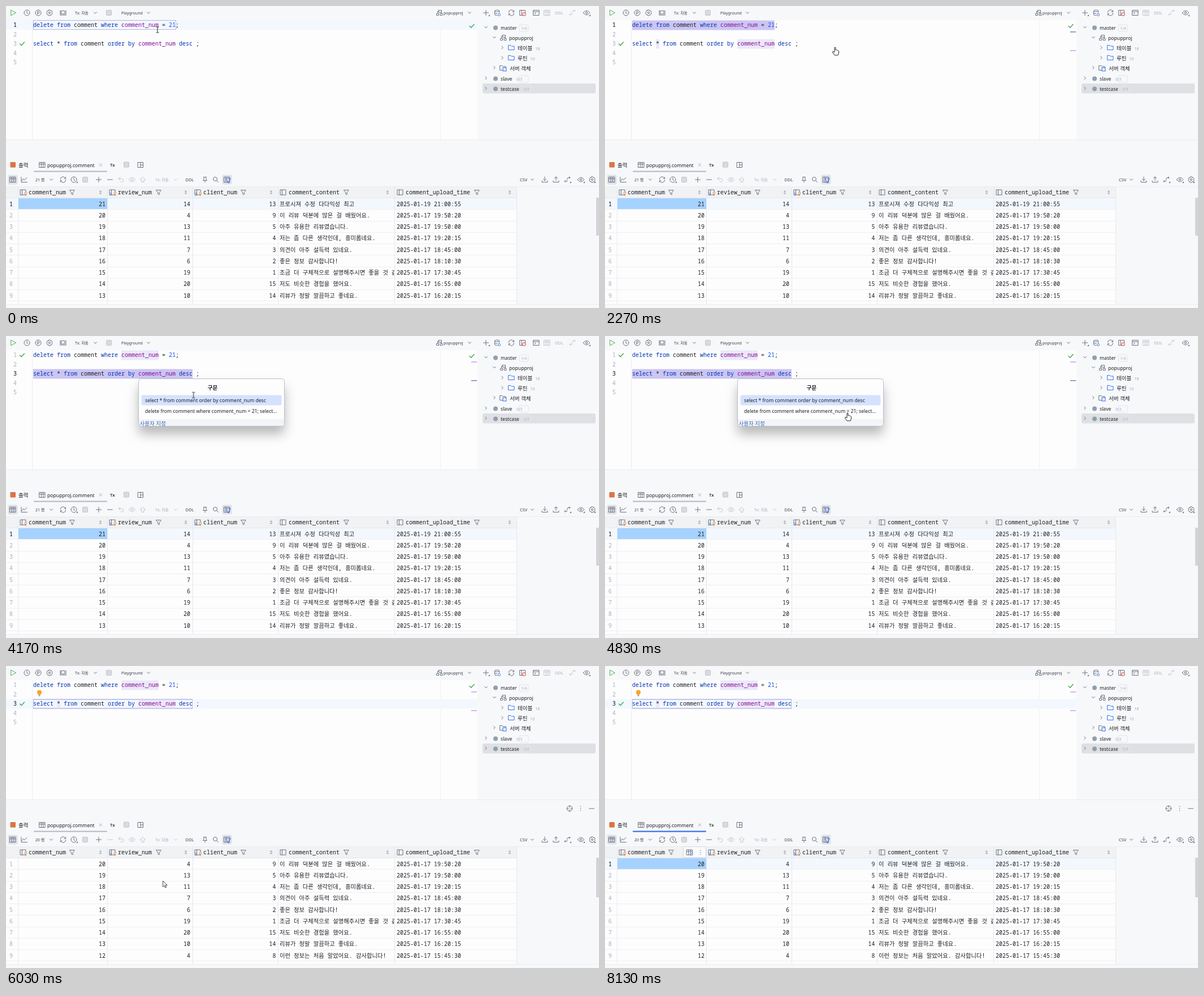
Write an HTML page that moves like this. It is 1049 px wide and 534 px high and loops after 8160 ms.

```html
<!DOCTYPE html>
<html lang="ko">
<head>
<meta charset="utf-8">
<title>SQL console</title>
<style>
html, body { margin: 0; width: 100%; height: 100%; overflow: hidden; background: #f7f8fa; }
svg { display: block; width: 1049px; height: 534px; }
text { font: 8.65px 'Noto Sans', 'Noto Sans CJK KR', sans-serif; fill: #1e1f24; white-space: pre; }
text.s { font-size: 7px; fill: #3c3f49; }
text.m { font-size: 7.5px; fill: #3c3f49; }
text.k { font-size: 9.5px; }
text.b { font-weight: 600; }
text.c { font: 10px 'Noto Sans Mono', 'DejaVu Sans Mono', monospace; }
text.h { font: 10.3px 'Noto Sans Mono', 'Noto Sans CJK KR', monospace; }
text.dim { fill: #a8adbd; }
text.e { text-anchor: end; }
text.mid { text-anchor: middle; }
.kw { fill: #0033b3; } .col { fill: #871094; } .num { fill: #1750eb; }
.ic { fill: none; stroke-width: 1; stroke-linecap: round; stroke-linejoin: round; }
#mouse { animation: move 8160ms linear infinite; }
@keyframes move {
  0%, 5% { transform: translate(268px, 42px); animation-timing-function: ease-in-out; }
  12.5%, 28.8% { transform: translate(407px, 73px); animation-timing-function: ease-in-out; }
  40.5%, 44% { transform: translate(237px, 66px); animation-timing-function: ease-in-out; }
  51% { transform: translate(330px, 104px); }
  58%, 59.8% { transform: translate(429px, 136px); animation-timing-function: ease-in-out; }
  62.5%, 64.2% { transform: translate(408px, 116px); animation-timing-function: ease-in; }
  68.6% { transform: translate(340px, 280px); animation-timing-function: ease-out; }
  73%, 75.5% { transform: translate(277.5px, 380px); animation-timing-function: ease-in-out; }
  82.5%, 100% { transform: translate(128px, 351px); }
}
</style>
</head>
<body>
<svg id="stage" viewBox="0 0 1049 534" xmlns="http://www.w3.org/2000/svg"></svg>
<script>
const LOOP = 8160;
const INK = '#6c707e', PALE = '#c4c7d0', BLUE = '#3574f0', GREEN = '#4fae5b';
let rules = '', layers = 0;

const rect = (x, y, w, h, fill, more = '') =>
  `<rect x="${x}" y="${y}" width="${w}" height="${h}" fill="${fill}" ${more}/>`;
const text = (x, y, s, cls = '') => `<text x="${x}" y="${y}" class="${cls}">${s}</text>`;

// Shows markup only inside the given [from, to] spans (ms).
function during(spans, body) {
  const name = 'on' + layers++;
  let frames = spans[0][0] ? '0%{visibility:hidden}' : '';
  for (const [a, b] of spans) {
    frames += `${a / LOOP * 100}%{visibility:visible}`;
    if (b < LOOP) frames += `${b / LOOP * 100}%{visibility:hidden}`;
  }
  const last = spans[spans.length - 1][1] < LOOP ? 'hidden' : 'visible';
  rules += `@keyframes ${name}{${frames}100%{visibility:${last}}}`;
  return `<g style="animation:${name} ${LOOP}ms step-end infinite">${body}</g>`;
}

// Line icons, centred on 0,0
const ring = r => `M${-r} 0a${r} ${r} 0 1 0 ${2 * r} 0a${r} ${r} 0 1 0 ${-2 * r} 0`;
const ICONS = {
  down: 'M-2.5-1.2L0 1.3 2.5-1.2', right: 'M-1.2-2.5L1.3 0-1.2 2.5',
  clock: ring(5) + 'M0-3V0.5L2 1.5',
  plan: ring(5) + 'M-1.2 2.8V-2.6H.4a1.6 1.6 0 0 1 0 3.3H-1.2',
  gear: 'M-1.3-5H1.3L1.9-3.5 3.4-3.9 5-1.2 4 0 5 1.2 3.4 3.9 1.9 3.5 1.3 5H-1.3L-1.9 3.5-3.4 3.9-5 1.2-4 0-5-1.2-3.4-3.9-1.9-3.5Z' + ring(1.6),
  pages: 'M-3-3.5H3V2H-3ZM-5-4V3.5M5-4V3.5M-5 4H5',
  schema: 'M-1.5-4.5H3.5V-1H-1.5ZM-5 1.2H-1.5V4.5H-5ZM1.5 1.2H5V4.5H1.5ZM-3.3 1V-2.7H-1.7M3.2 1V-1',
  plus: 'M-4.5 0H4.5M0-4.5V4.5', minus: 'M-4.5 0H4.5',
  db: 'M-4.5-3.5C-4.5-5.5 3.5-5.5 3.5-3.5S-4.5-1.5-4.5-3.5V3C-4.5 4.2-2 4.7 0 4.5M3.5-3.5V0M-4.5 0C-4 1.5-1 1.5 0 1.3',
  refresh: 'M-4.7-.5A4.5 4.5 0 0 1 4-2.2M4.7.5A4.5 4.5 0 0 1-4 2.2M4.6-4.2V-1.8H2.2M-4.6 4.2V1.8H-2.2',
  console: 'M-5-4.5H5V4.5H-5ZM-5-2H5M-2.5 0L-1 1.2-2.5 2.4',
  table: 'M-5-4.5H5V4.5H-5ZM-5-1.5H5M-1.7-4.5V4.5M1.7-4.5V4.5',
  swap: 'M5-3.5H1L-1 0M3.3-5L5-3.5 3.3-2M-5 3H-1L0 1.5M-3.5 1.5L-5 3-3.5 4.5',
  eye: 'M-5.5 0C-3-5 3-5 5.5 0C3 5-3 5-5.5 0Z' + ring(1.7),
  chart: 'M-5-4.5V4.5H5.5M-4 2L-1.5-1.5 1 .7 5-3.8',
  undo: 'M-2-4.5L-5-1.7-2 1M-5-1.7H1.5A2.9 2.9 0 0 1 1.5 4H-1',
  up: 'M0-4.5L4.5 0H2V4.5H-2V0H-4.5Z',
  pin: 'M-2.5-4.5H2.5M-2-4.5V-.5L-3.5 1.5H3.5L2-.5V-4.5M0 1.5V5',
  search: 'M-4.5-1a3.5 3.5 0 1 0 7 0a3.5 3.5 0 1 0-7 0M1.5 1.5L4.7 4.7',
  funnel: 'M-4-4H4V-3L1.2.3V4L-1.2 3V.3L-4-3Z',
  save: 'M0-5V1.5M-2.7-1L0 1.7 2.7-1M-5 2V4.5H5V2',
  load: 'M0 1.5V-5M-2.7-2.3L0-5 2.7-2.3M-5 2V4.5H5V2',
  layout: 'M-4.5-4.5H4.5V4.5H-4.5ZM0-4.5V4.5M0 0H4.5',
  cross: 'M-2.3-2.3L2.3 2.3M2.3-2.3L-2.3 2.3',
  target: ring(4.8) + 'M0-4.8V-1.8M0 4.8V1.8M-4.8 0H-1.8M4.8 0H1.8',
  check: 'M-4 0L-1.2 2.8 4-3', folder: 'M-5-4H-1.2L.3-2.5H5V4H-5Z',
  column: 'M-5-4.5H4.5V4.5H-5ZM-2-4.5V4.5', play: 'M-4-4.7L4.5 0-4 4.7Z',
  dots: 'M0-3.5V-3.4M0 0V.1M0 3.5V3.6', sort: 'M-1.3-1.5L0-3 1.3-1.5ZM-1.3 1.5L0 3 1.3 1.5Z'
};
const icon = (name, x, y, color = INK, more = '') =>
  `<path class="ic" d="${ICONS[name]}" transform="translate(${x} ${y})" stroke="${color}" ${more}/>`;
const row = (y, list) => list.map(([name, x, color]) => icon(name, x, y, color)).join('');
const stopBox = (x, y) => rect(x - 4.5, y - 4.5, 9, 9, '#d9dae0', 'stroke="#c4c5cb" rx="1"');
const corner = (x, y) => `<path d="M${x} ${y}h-3l3-3z" fill="${INK}"/>`;

function chrome() {
  return rect(0, 0, 1049, 534, '#f7f8fa') +
    rect(0, 25, 834, 211, '#fdfdfe') + rect(0, 236, 1049, 1, '#ebecf0') +
    rect(768, 25, 1, 211, '#f0f1f4') +
    icon('play', 13, 12, GREEN, 'fill="#f2fcf3"') +
    row(12, [['clock', 37], ['plan', 57], ['gear', 77], ['pages', 101], ['down', 158], ['down', 252],
      ['schema', 767], ['down', 820], ['plus', 849], ['db', 869], ['refresh', 894], ['console', 938],
      ['table', 957, PALE], ['swap', 1002, PALE], ['eye', 1027]]) +
    icon('column', 914, 12, INK) + rect(914, 12, 5, 5, '#fff0f0', 'stroke="#db3b4b" rx="1"') +
    `<circle cx="872.5" cy="15.5" r="2" fill="#fff" stroke="${BLUE}"/>` +
    corner(856, 18) + corner(1034, 18) + stopBox(182, 12) +
    text(122, 14.8, 'Tx: 자동', 's') + text(204, 14.8, 'Playground', 's') +
    text(774, 14.8, 'popupproj', 's') + text(971, 14.8, 'DDL', 'm dim');
}

function tree() {
  const db = (y, name, count, open) =>
    icon(open ? 'down' : 'right', 849, y - 1) + `<circle cx="866" cy="${y}" r="4" fill="#8fa0ae"/>` +
    text(875, y + 3.6, name) + rect(908, y - 5.5, name[0] === 't' ? 21 : 16, 12, 'none', 'rx="2" stroke="#e4e5ea"') +
    text(name[0] === 't' ? 915 : name[0] === 's' ? 903 : 911, y + 3.4, count, 's dim');
  const folder = (y, name, count, x) =>
    icon('right', 878, y - 1) + icon('folder', 894, y - 1, BLUE, 'fill="#e7effd"') +
    text(905, y + 3.6, name, 'k') + text(x, y + 3.6, count, 'm dim');
  return rect(843, 137, 200, 17.5, '#dfe0e4', 'rx="3"') +
    db(38.5, 'master', '1/4', true) +
    icon('down', 864, 55.5) + icon('schema', 880, 56) + text(890, 60, 'popupproj') +
    folder(74.5, '테이블', '18', 936) + folder(92.5, '루틴', '10', 927) +
    icon('right', 864, 109) + icon('folder', 879, 109.5, INK) +
    rect(879, 109, 6, 6, '#e7effd', `stroke="${BLUE}"`) + text(891, 114, '서버 객체', 'k') +
    db(128.5, 'slave', '0/3') + db(146.5, 'testcase', '1/7');
}

const RUN1 = 1500, DONE1 = 2330, CLICK3 = 3560, RUN3 = 4150, DONE3 = 5250, LOADED = 5400, PICK = 6880;
const ON1 = [[0, RUN1], [DONE1, CLICK3]];
const ON3 = [[CLICK3, RUN3], [DONE3, LOOP]];

function editor() {
  const current = (y, w) => rect(0, y, 834, 17, '#f3f8fe') +
    rect(48.5, y + .5, w, 16, 'none', 'stroke="#b3b5e3"');
  const select = (y, w) => rect(48, y, w, 17, '#cbc5f3');
  const hl = (x, y, w) => rect(x, y, w, 17, '#ebe8f9');
  const mark = (y, c) => rect(823, y, 10, 1.6, c);
  const VIOLET = '#cda0f5', DARK = '#7f88b8';
  const check = y => icon('check', 28.5, y, GREEN, 'style="stroke-width:1.6"');
  const bulb = y => `<circle cx="59" cy="${y - 1.5}" r="4" fill="#f5a623"/>` +
    rect(57.2, y + 2.5, 3.6, 1.4, '#c98a2b') + rect(57.6, y + 4.5, 2.8, 1, '#8a8f9c');
  const kw = s => `<tspan class="kw">${s}</tspan>`;
  const col = '<tspan class="col">comment_num</tspan>';
  const nums = [1, 2, 3, 4, 5].map(n => text(19, 20.8 + n * 16.5, n, 'c e dim')).join('');
  return during(ON1, current(25, 252)) + during(ON3, current(58.5, 281)) +
    rect(46, 25, 1, 211, '#ebecf0') +
    during([[250, LOOP]], hl(204, 25.5, 66) + hl(90, 58.5, 6) + hl(234, 58.5, 66)) +
    during([[RUN1, DONE1]], select(25.5, 252)) + during([[RUN3, DONE3]], select(58.5, 282)) +
    during(ON1, rect(48.5, 25.5, 252, 16, 'none', 'stroke="#b3b5e3"')) +
    during(ON3, rect(48.5, 59, 281, 16, 'none', 'stroke="#b3b5e3"')) +
    nums + during([[0, CLICK3]], text(19, 37.3, 1, 'c e')) + during([[CLICK3, LOOP]], text(19, 70.3, 3, 'c e')) +
    text(48, 37.3, `${kw('delete from')} comment ${kw('where')} ${col} = <tspan class="num">21</tspan>;`, 'c') +
    text(48, 70.3, `${kw('select')} * ${kw('from')} comment ${kw('order by')} ${col} ${kw('desc')} ;`, 'c') +
    during([[2450, 5300]], check(34)) + during([[0, 2400], [5330, LOOP]], check(67)) +
    during([[2900, CLICK3]], bulb(52)) + during([[5700, LOOP]], bulb(48)) +
    icon('check', 824, 35.5, GREEN, 'style="stroke-width:1.6"') +
    during([[250, RUN1], [DONE1, LOOP]], mark(45, VIOLET)) + during([[RUN1, DONE1]], mark(45, DARK)) +
    during([[250, RUN3], [DONE3, LOOP]], mark(78, VIOLET)) + during([[RUN3, DONE3]], mark(78, DARK)) +
    during([[100, 600], [1100, RUN1], [2450, 2900]], rect(264, 26, 1.3, 15.5, '#000')) +
    during([[CLICK3, 4060], [5400, 5900], [6400, PICK]], rect(234, 59, 1.3, 15.5, '#000'));
}

function toolWindow() {
  const pressed = x => rect(x - 8.5, 298.5, 17, 17, '#dfe1e8', 'rx="3"');
  const tx = (x, y) => text(x, y, 'Tx', 'm b');
  return row(281, [['table', 64], ['cross', 167.5, '#a8adbd'], ['layout', 238]]) +
    rect(7.5, 276, 9.5, 9.5, '#d97745', 'rx="1"') + text(22, 284.5, '출력', 'k') +
    text(73, 284.7, 'popupproj.comment') + tx(184, 283.5) + stopBox(213, 280.5) +
    rect(49, 291.5, 130, 2, '#b4b8c3', 'rx="1"') +
    during([[PICK, LOOP]], rect(49, 291.5, 130, 2, BLUE, 'rx="1"')) +
    during([[5850, LOOP]], row(252, [['target', 997], ['minus', 1036]]) +
      icon('dots', 1016.5, 252, INK, 'style="stroke-width:1.5"')) +
    pressed(12) + pressed(391) +
    row(307, [['table', 12], ['chart', 32], ['down', 80], ['refresh', 101], ['clock', 120], ['plus', 164],
      ['undo', 204, PALE], ['eye', 223, PALE], ['up', 242, PALE], ['down', 300, PALE], ['pin', 352],
      ['search', 371], ['column', 391], ['down', 931], ['save', 953], ['load', 973], ['swap', 993],
      ['eye', 1017], ['gear', 1037]]) +
    icon('funnel', 393, 309, BLUE, 'fill="#e7effd"') +
    corner(127, 313) + corner(1000, 313) + corner(1024, 313) + corner(1043, 313) + stopBox(140, 307) +
    during([[0, LOADED], [PICK, LOOP]], icon('minus', 184, 307)) +
    during([[LOADED, PICK]], icon('minus', 184, 307, PALE)) +
    during([[0, LOADED]], text(52, 309.8, '21 행', 's')) +
    during([[LOADED, LOOP]], text(52, 309.8, '20 행', 's')) +
    text(264, 309.8, 'Tx: 자동', 's dim') + text(317.5, 309.8, 'DDL', 'm') + text(909, 309.8, 'CSV', 'm');
}

const COLS = [['comment_num', 25, 117, 180], ['review_num', 183, 270, 331], ['client_num', 334, 420, 482],
  ['comment_content', 485, 602, 688], ['comment_upload_time', 692, 833, 904]];
const DATA = [
  [21, 14, 13, '프로시져 수정 다다익성 최고', '19 21:00:55'],
  [20, 4, 9, '이 리뷰 덕분에 많은 걸 배웠어요.', '17 19:50:20'],
  [19, 13, 5, '아주 유용한 리뷰였습니다.', '17 19:50:00'],
  [18, 11, 4, '저는 좀 다른 생각인데, 흥미롭네요.', '17 19:20:15'],
  [17, 7, 3, '의견이 아주 설득력 있네요.', '17 18:45:00'],
  [16, 6, 2, '좋은 정보 감사합니다!', '17 18:10:30'],
  [15, 19, 1, '조금 더 구체적으로 설명해주시면 좋을 것 같아요.', '17 17:30:45'],
  [14, 20, 15, '저도 비슷한 경험을 했어요.', '17 16:55:00'],
  [13, 10, 14, '리뷰가 정말 깔끔하고 좋네요.', '17 16:20:15'],
  [12, 4, 8, '이런 정보는 처음 알았어요. 감사합니다!', '17 15:45:30']
];

function grid() {
  const PITCH = 20.25;
  const cells = rows => rows.map(([a, b, c, note, time], i) => {
    const y = 353.6 + i * PITCH;
    return text(176, y, a, 'c e') + text(326, y, b, 'c e') + text(477.5, y, c, 'c e') +
      text(484, y, note, 'h" clip-path="url(#note)') + text(691, y, '2025-01-' + time, 'c');
  }).join('');
  let lines = '', heads = '', nums = '';
  for (let i = 1; i <= 9; i++) {
    lines += rect(0, Math.round(339 + i * PITCH), 904, 1, '#eeeff0');
    nums += text(12, 353.6 + (i - 1) * PITCH, i, 'c e dim');
  }
  for (const [name, x, fx, end] of COLS) {
    const key = end < 483;
    lines += rect(end - 1, 320, 1, 207, '#e6e7ec');
    heads += icon('column', x + 5.5, 329.5) + text(x + 15, 332.8, name, 'c') + icon('funnel', fx, 329.5) +
      icon('sort', end - 13, 329.5, INK, `fill="${INK}" style="stroke-width:.6"`);
    if (key) heads += `<circle cx="${x + 10}" cy="331" r="1.8" fill="#fff" stroke="#e08a3c"/>` +
      rect(x + 9.5, 333, 1, 3, '#e08a3c');
    if (key && x > 30) heads += icon('right', x + 2, 332.5, BLUE);
  }
  return '<clipPath id="note"><rect x="482" y="339" width="204.5" height="188"/></clipPath>' +
    rect(0, 339, 904, 188, '#fdfdfe') + rect(0, 320, 904, 19, '#f1f2f4') +
    rect(0, 319, 1049, 1, '#ebecf0') + rect(0, 339, 904, 1, '#e6e7ec') +
    during([[0, LOADED], [PICK, LOOP]], rect(0, 340, 904, 19, '#f3f8fe') + rect(22, 340, 157, 19, '#a6d2ff')) +
    lines + rect(21, 320, 1, 207, '#ebecf0') + nums + heads +
    during([[0, LOADED], [PICK, LOOP]], text(12, 353.6, 1, 'c e')) +
    during([[6750, LOOP]], rect(138.5, 319.5, 40, 19, '#fbfbfd', 'stroke="#d3d5db" rx="1"') +
      icon('table', 149.5, 329.5) + `<circle cx="153.5" cy="333" r="1.8" fill="#fff" stroke="${BLUE}"/>` +
      icon('dots', 169, 329.5, INK, 'style="stroke-width:1.4"')) +
    during([[0, LOADED]], cells(DATA.slice(0, 9))) + during([[LOADED, LOOP]], cells(DATA.slice(1))) +
    rect(0, 527, 1049, 1, '#ebecf0') +
    during([[0, LOADED]], rect(1044, 339, 5, 67, '#d3d4d8')) +
    during([[LOADED, LOOP]], rect(1044, 339, 5, 70, '#d3d4d8'));
}

function popup(x, y, first) {
  return `<g transform="translate(${x} ${y})">` +
    rect(0, 0, 258, 84, '#fff', 'rx="5" filter="url(#shade)"') +
    rect(0, 0, 258, 84, '#fdfdfe', 'rx="5" stroke="#b9bdc9"') +
    `<path d="M.5 71.5H257.5V79a5 5 0 0 1-5 4.5H5.500A5 5 0 0 1 .5 79Z" fill="#f3f4f7"/>` +
    text(131, 19, '구문', 'k b mid') + rect(5, 29, 248, 18, '#d4e2ff', 'rx="3"') +
    text(11.5, 41.8, first) + text(11.5, 60.3, 'delete from comment where comment_num = 21; select...') +
    '<text x="2" y="82" class="k" style="fill:#3768b8">사용자 지정</text></g>';
}

function mouse() {
  const beam = 'M-2.500-5H-.8L0-4.300 .8-5H2.500M0-4.300V4.300M-2.500 5H-.8L0 4.300 .8 5H2.500';
  const hand = 'M-1 .5Q0-.8 1 .5V5L2.300 4.500 3.300 5.200 4.500 5 5.500 5.800 6.500 6.500V10Q6.300 12 5 14H-.8L-4.500 9Q-4.500 7.200-3 7.500L-1 9Z';
  const arrow = 'M0 0V10.500L2.500 8.300 4.200 12 6 11.200 4.400 7.600H7.600Z';
  const shape = (d, w) => `<path d="${d}" fill="#fff" stroke="#222" stroke-width="${w}" stroke-linejoin="round"/>`;
  return '<g id="mouse">' +
    during([[0, 1520], [2300, 4180], [DONE3, 5600]], `<path d="${beam}" fill="none" stroke="#222"/>`) +
    during([[1520, 2300], [4180, DONE3]], shape(hand, 1)) +
    during([[5600, 7300]], shape(arrow, .9)) + '</g>';
}

document.getElementById('stage').innerHTML =
  '<filter id="shade" x="-20%" y="-30%" width="140%" height="200%">' +
  '<feDropShadow dx="0" dy="14" stdDeviation="10" flood-color="#000" flood-opacity=".27"/></filter>' +
  chrome() + tree() + editor() + toolWindow() + grid() +
  during([[1520, 2260]], popup(264.5, 42.5, 'delete from comment where comment_num = 21')) +
  during([[RUN3, 5230]], popup(234.5, 75.5, 'select * from comment order by comment_num desc')) +
  mouse();
document.head.appendChild(document.createElement('style')).textContent = rules;
</script>
</body>
</html>
```
